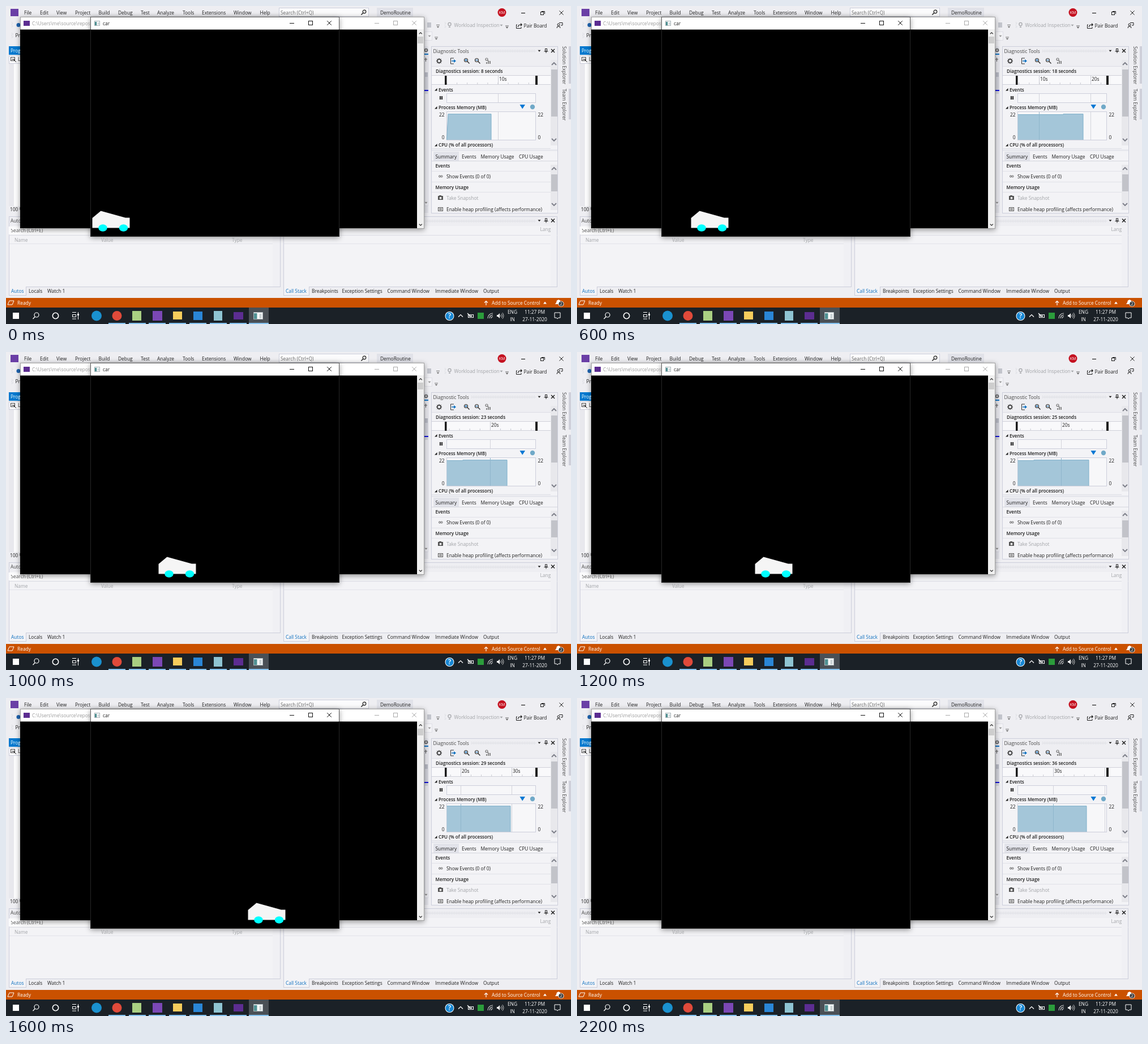
An HTML page with a canvas for the animation above (2.4 s loop, 998 by 561 pixels).

```html
<!DOCTYPE html>
<html lang="en">
<head>
<meta charset="utf-8">
<title>Car</title>
<style>
html, body { margin: 0; width: 100%; height: 100%; overflow: hidden; background: #eeeef2; }
canvas, svg.text { position: absolute; left: 0; top: 0; width: 998px; height: 561px; }
text { font-family: "Open Sans", "Noto Sans", sans-serif; white-space: pre; }
</style>
</head>
<body>
<canvas id="stage" width="998" height="561"></canvas>
<svg class="text" id="labels" viewBox="0 0 998 561"></svg>
<script>
const g = document.getElementById('stage').getContext('2d');
const labels = document.getElementById('labels');
const INK = '#1e1e1e', DIM = '#a2a4a8', BLUE = '#0e70c0', PALE = '#f3f3f6', EDGE = '#cccedb';
const STEP = 200, COUNT = 12;
// Session clock at each step, in seconds
const CLOCK = [8.7, 12.4, 16.05, 18.6, 20.8, 23.3, 25.4, 27.5, 29.7, 32.2, 34.3, 36.45];

// ---------- helpers ----------
function box(x, y, w, h, fill, stroke) {
  if (fill) { g.fillStyle = fill; g.fillRect(x, y, w, h); }
  if (stroke) { g.strokeStyle = stroke; g.lineWidth = 1; g.strokeRect(x + .5, y + .5, w - 1, h - 1); }
}
function trace(pts, close) {
  g.beginPath();
  for (let i = 0; i < pts.length; i += 2) g.lineTo(pts[i], pts[i + 1]);
  if (close) g.closePath();
}
function line(color, width, ...pts) {
  trace(pts);
  g.strokeStyle = color; g.lineWidth = width; g.stroke();
}
function poly(color, ...pts) {
  trace(pts, true);
  g.fillStyle = color; g.fill();
}
function disc(x, y, rx, color, ry = rx) {
  g.beginPath(); g.ellipse(x, y, rx, ry, 0, 0, 7);
  g.fillStyle = color; g.fill();
}
function ring(x, y, r, color, width = 1, from = 0, to = 7) {
  g.beginPath(); g.arc(x, y, r, from, to);
  g.strokeStyle = color; g.lineWidth = width; g.stroke();
}
function down(x, y, color, s = 2.5) { poly(color, x - s, y - s / 2, x + s, y - s / 2, x, y + s / 2 + .5); }
function cross(x, y, s, color, w = 1) {
  line(color, w, x - s, y - s, x + s, y + s);
  line(color, w, x + s, y - s, x - s, y + s);
}
function chevron(x, y, s, color, w = 1.2) { line(color, w, x - Math.abs(s), y + s / 2, x, y - s / 2, x + Math.abs(s), y + s / 2); }
function glass(x, y, r, color, dir = 1) {
  ring(x, y, r, color, 1.2);
  line(color, 1.4, x + dir * r * .7, y + r * .7, x + dir * r * 2, y + r * 2);
}
function controls(xs, y, color) {
  line(color, 1, xs[0] - 4, y + .5, xs[0] + 4, y + .5);
  box(xs[1] - 4, y - 4, 8, 8, null, color);
  cross(xs[2], y, 3.8, color);
}
function pin(x, y) {
  box(x - 2, y - 4, 4, 5, null, INK);
  line(INK, 1, x - 3.5, y + 1, x + 3.5, y + 1);
  line(INK, 1, x, y + 1, x, y + 4);
}
function grip(x, y, w) {
  g.fillStyle = '#b9bbc6';
  for (let i = 0; i < w; i += 3) {
    g.fillRect(x + i, y - 1.5, .8, .8);
    g.fillRect(x + i + 1.5, y, .8, .8);
    g.fillRect(x + i, y + 1.5, .8, .8);
  }
}
function paneTools(y) { down(942, y, INK); pin(954, y); cross(966, y, 3, INK, 1.4); }
function gear(x, y, r, color) {
  ring(x, y, r * .6, color, 1.4);
  for (let i = 0; i < 8; i++) {
    const c = Math.cos(i * Math.PI / 4), s = Math.sin(i * Math.PI / 4);
    line(color, 1.3, x + c * r * .7, y + s * r * .7, x + c * r, y + s * r);
  }
}
function windowIcon(x, y, w, h) {
  box(x, y, w, h, '#f6f8f8', '#aab4b8');
  box(x + 1, y + 2, w * .32, h - 3, '#4f9092');
  box(x + w * .62, y + 3, w * .22, h - 5, '#c9d2d5');
}
function shadowBox(x, y, w, h) {
  g.save();
  g.shadowColor = 'rgba(0,0,0,.4)'; g.shadowBlur = 9; g.shadowOffsetY = 2;
  box(x, y, w, h, '#fff');
  g.restore();
}
function say(str, x, y, o = {}) {
  const ns = 'http://www.w3.org/2000/svg', t = document.createElementNS(ns, 'text');
  const put = (el, set) => { for (const k in set) el.setAttribute(k, set[k]); };
  put(t, { x, y, fill: o.fill || INK, 'font-size': o.size || (o.bold ? 8.1 : 8.4) });
  if (o.bold) t.setAttribute('font-weight', 600);
  if (o.anchor) t.setAttribute('text-anchor', o.anchor);
  if (o.turn) t.setAttribute('transform', `rotate(90 ${x} ${y})`);
  t.textContent = str;
  let host = labels;
  if (o.clip) {
    const [cx, cy, w, h] = o.clip;
    host = document.createElementNS(ns, 'svg');
    put(host, { x: cx, y: cy, width: w, height: h, viewBox: o.clip.join(' '), overflow: 'hidden' });
    labels.append(host);
  }
  host.append(t);
  return t;
}

// ---------- still parts ----------
function drawIde() {
  box(0, 0, 998, 561, '#eeeef2');
  box(8, 5, 14, 13, '#6a3fa6');
  box(482, 3, 159, 16, '#fbfbfc', EDGE);
  glass(633, 10, 2.8, INK, -1);
  box(655, 3, 64, 17, '#e1e2e9');
  disc(876, 11.5, 7.5, '#c4101f');
  line(INK, 1.2, 910, 12.5, 917, 12.5);
  box(944, 10, 6, 6, null, INK);
  line(INK, 1, 946, 9.5, 951.5, 9.5, 951.5, 14);
  cross(981, 12, 3.6, INK);

  // Toolbars
  grip(10, 30, 3); grip(10, 35, 3); grip(10, 49, 3); grip(10, 54, 3);
  disc(22, 33.5, 3.5, '#1d63b0');
  box(744, 29, 7, 9, '#c3c5cc'); down(763, 37, '#777');
  line('#777', 1, 760, 33.5, 766, 33.5);
  grip(775, 30, 2); grip(775, 36, 2);
  ring(783.5, 32, 2.6, DIM, 1.2); line(DIM, 1.6, 782, 37, 785, 37);
  down(875, 34, DIM); down(885, 38, '#666'); line('#666', 1, 882, 35, 888, 35);
  line(INK, 1, 903, 33, 901.5, 33, 901.5, 39.5, 910, 39.5, 910, 37);
  line(INK, 1.2, 904, 37, 906, 33.5, 910, 33); poly(INK, 909, 30, 912, 33, 909, 36);
  ring(976, 33, 2, INK); line(INK, 1, 973, 39, 974, 36, 978, 36, 979, 39);
  line(INK, 1, 977, 29.5, 983, 29.5, 983, 34, 980, 34);
  box(739, 45, 14, 16, '#f4f4f7', '#dfdfe6'); down(748, 53, '#999');
  line('#777', 1, 757, 55, 763, 55); down(760, 58, '#777');

  // Editor edges
  box(5, 71, 20, 15, '#0079cf');
  box(5, 87, 21, 15, '#f8f8fa', EDGE);
  box(8, 90, 8, 7, null, '#444'); line(INK, 1, 13, 94, 18, 99); line(INK, 1, 10, 94, 15, 94);
  box(5, 102, 20, 251, '#fcfcfd'); box(5, 102, 9, 251, '#e8e8ed');
  box(739, 71, 7, 15, '#e4e5ec'); box(739, 84, 7, 2, '#0e70c0');
  gear(742, 78, 3.5, '#555');
  box(739, 87, 7, 266, '#ececf1', '#d6d7df');
  line('#555', 1, 739, 94, 744, 94); line('#555', 1, 741.5, 91, 741.5, 98);
  box(740, 117, 5, 8, '#b8bac4'); box(739, 125, 7, 30, '#d3d4dc'); box(739, 148, 7, 2, '#1010d8');
  down(742, 347, '#888'); box(739, 353, 7, 12, '#e1e2e8');

  // Bottom panes
  for (const [x, w] of [[5, 480], [490, 484]]) {
    box(x, 371, w, 125, PALE, EDGE);
    box(x + 1, 372, w - 2, 16, '#eeeef2');
    line('#e2e3ea', 1, x + 1, 419.5, x + w - 1, 419.5);
  }
  box(5, 389, 479, 14, '#fbfbfc');
  line('#dcdde4', 1, 5, 404.5, 485, 404.5); line('#dcdde4', 1, 490, 404.5, 974, 404.5);
  box(471, 405, 13, 90, '#f0f0f4'); box(962, 389, 11, 106, '#f0f0f4');
  box(5, 495, 31, 16, PALE, EDGE); box(490, 495, 46, 16, PALE, EDGE);
  box(6, 495, 29, 1, PALE); box(491, 495, 44, 1, PALE);
  grip(741, 379, 193); paneTools(378.5);

  // Side tabs
  box(994, 71, 4, 66, '#cfd0da'); box(994, 146, 4, 54, '#cfd0da');
}

function drawDiagnostics() {
  box(751, 71, 224, 295, PALE, EDGE);
  box(752, 72, 222, 34, '#eeeef2');
  grip(822, 79, 112); paneTools(79);
  gear(765, 97, 5, '#333');
  line('#333', 1, 791, 92, 785.5, 92, 785.5, 102, 791, 102);
  line(BLUE, 1.5, 787, 97, 793, 97); poly(BLUE, 791, 94, 795, 97, 791, 100);
  for (const x of [812.5, 831.5]) { glass(x, 95.5, 3, '#333'); line(BLUE, 1, x - 1.8, 95.5, x + 1.8, 95.5); }
  line(BLUE, 1, 812.5, 93.7, 812.5, 97.3);
  glass(849, 94, 2, '#777');
  for (let i = 0; i < 3; i++) box(848 + i * 3, 99 - i, 2, 3 + i, '#888');
  line('#dcdde4', 1, 752, 106.5, 974, 106.5);
  box(752, 122, 210, 17, '#f9f9fb');
  line('#d0d1d9', 1, 752, 122.5, 962, 122.5); line('#d0d1d9', 1, 752, 138.5, 962, 138.5);
  line('#dcdde4', 1, 752, 251.5, 962, 251.5);
  box(752, 253, 222, 3, '#e6e7ed');
  box(752, 256, 222, 18, '#f3f3f6'); box(755, 257, 45, 16, '#e2e3ea');
  line('#d6d7df', 1, 752, 273.5, 974, 273.5);
  for (const y of [291.5, 310.5, 328.5]) line('#e0e1e7', 1, 752, y, 962, y);

  // Scroll bars
  for (const [y, h, ty, th] of [[95, 151, 112, 83], [280, 80, 297, 30]]) {
    box(962, y, 12, h, '#e8e8ec');
    box(963, ty, 11, th, '#c2c3c9');
    chevron(968, y + 7, 4, '#7b7d87', 1.8); chevron(968, y + h - 10, -4, '#7b7d87', 1.8);
  }

  for (const y of [147, 179, 245]) poly(INK, 757, y + 2.5, 761.5, y + 2.5, 761.5, y - 2);
  box(766, 159, 2, 6, INK); box(769, 159, 2, 6, INK);
  poly('#0078d4', 907.5, 174, 917, 174, 912.2, 181.5);
  disc(930, 178, 4.2, '#70a9c8');

  ring(766, 300.5, 1.5, '#555'); ring(769.5, 300.5, 1.5, '#555');
  box(763, 335, 9, 7, '#555'); disc(767.5, 338.7, 2, '#eee'); box(765, 334, 4, 1, '#555');
  box(763, 355, 9, 7, null, '#555'); line('#555', 1, 765, 357.5, 770, 357.5); line('#555', 1, 765, 359.5, 770, 359.5);
}

function drawWindows() {
  shadowBox(25, 19, 714, 374);
  box(25, 19, 714, 374, '#fff', '#a0a0a0');
  box(25, 41.5, 701, 350.5, '#000');
  box(726, 41, 12, 351, '#f0f0f0'); box(727, 54, 10, 12, '#cdcdcd');
  chevron(732.3, 48, 2.5, '#333'); chevron(732.3, 386, -2.5, '#333');
  box(31, 26, 11, 9, '#5c2d91');
  controls([655, 688, 721], 30, '#aaa');

  shadowBox(149, 19, 440, 388);
  box(149, 19, 440, 23, '#fff', '#5a5a5a');
  box(149, 41.5, 440, 365.5, '#000');
  line('#262626', 1, 149.5, 42, 149.5, 406.5, 588.5, 406.5, 588.5, 42);
  box(150, 40, 438, 1.5, '#fff');
  windowIcon(156, 26, 10, 9);
  controls([505, 538, 571], 30, '#111');
}

function drawBars() {
  box(0, 515, 998, 17, '#ca5100');
  trace([6, 520, 14, 520, 11, 527, 3, 527], true); g.strokeStyle = '#fff'; g.lineWidth = 1; g.stroke();
  line('#fff', 1.2, 848, 528, 848, 520.5); line('#fff', 1.2, 845, 523.5, 848, 520.5, 851, 523.5);
  poly('#fff', 949, 525.5, 955, 525.5, 952, 521.5);
  poly('#fff', 970, 526, 972, 523, 973, 519.5, 976, 518, 979, 519.5, 979, 526);
  disc(980.5, 525.5, 5, '#fff'); disc(980.5, 525.5, 4.2, '#3a3a3a');

  box(0, 532, 998, 29, '#1b2127');
  box(12, 541, 11, 11, '#fff');
  ring(54, 545, 4, '#fff', 1.2); line('#fff', 1.3, 51.3, 548, 47.5, 552);
  ring(87.5, 546.5, 5.2, '#fff', 1.6);
  box(117, 544, 7, 5, null, '#fff');
  line('#fff', 1, 117, 540.5, 124, 540.5); line('#fff', 1, 117, 552, 124, 552);
  line('#fff', 1, 127.5, 540, 127.5, 553); box(126, 543, 3, 3, '#fff');
  disc(160, 546.5, 9, '#1a91cf');
  disc(196, 546.5, 8.5, '#e04a3a');
  box(429, 532, 35, 29, '#4a5056');
  const apps = [[223, 538, 16, 17, '#a9cf82'], [259, 538, 17, 17, '#7b48b5'], [295, 539, 16, 14, '#f6cc5c'],
    [331, 539, 16, 15, '#2a86d6'], [367, 538, 15, 17, '#8fc4d2'], [402, 540, 17, 13, '#5c2d91']];
  apps.forEach(a => box(...a));
  windowIcon(437, 540, 17, 13);
  for (let i = 0; i < 7; i++) box(Math.round(181 + i * 35.7), 559, 30, 2, '#86c4f2');
  box(429, 559, 35, 2, '#86c4f2');

  disc(783.5, 547, 8, '#fff'); disc(783.5, 547, 7, '#1787d4');
  chevron(803, 546.5, 4, '#fff', 1.2);
  box(816, 544, 10, 6, null, '#fff'); box(818, 546, 5, 2, '#fff'); line('#fff', 1.2, 815, 542, 819, 546);
  box(833, 541, 11, 11, '#2b9c3b');
  for (const r of [3, 6, 9]) ring(860, 551, r, '#ddd', 1.1, Math.PI, Math.PI * 1.5);
  poly('#fff', 867, 545, 869, 545, 872, 542, 872, 551, 869, 548, 867, 548);
  for (const r of [2.5, 5, 7.5]) ring(871.5, 546.5, r, '#ddd', .9, -.8, .8);
  trace([969, 541, 979, 541, 979, 550, 975.5, 550, 974, 552, 972.5, 550, 969, 550], true);
  g.strokeStyle = '#fff'; g.lineWidth = 1; g.stroke();
}

function writeLabels() {
  const row = (y, items, o) => items.forEach(([x, s]) => say(s, x, y, o));
  row(14.5, [[32, 'File'], [60, 'Edit'], [89, 'View'], [122, 'Project'], [163.5, 'Build'], [198, 'Debug'],
    [238, 'Test'], [267, 'Analyze'], [312, 'Tools'], [346, 'Extensions'], [402, 'Window'], [448.5, 'Help'], [661, 'DemoRoutine']]);
  say('Search (Ctrl+Q)', 485, 14.5, { fill: '#666' });
  say('KM', 876, 14.3, { fill: '#fff', size: 7, anchor: 'middle' });
  say('Workload Inspection', 791.5, 37, { fill: DIM });
  say('Pair Board', 914.5, 38);
  say('Program', 8, 82, { fill: '#fff', clip: [5, 71, 20, 15] });
  say('Lab', 21, 97, { clip: [5, 87, 20, 15] });
  say('Process', 16.5, 55, { clip: [5, 45, 20, 15] });
  say('100 %', 7, 362, { clip: [5, 352, 20, 15] });
  say('C:\\Users\\me\\source\\repos\\', 46, 33.5, { fill: '#999', clip: [25, 20, 123, 20] });
  say('car', 171, 33.5);
  say('Autos', 8, 382, { fill: '#444', clip: [5, 372, 20, 18] });
  say('Search (Ctrl+E)', 8.5, 398.5, { fill: '#555', clip: [5, 393, 144, 12] });
  row(415.5, [[15, 'Name'], [168, 'Value'], [399, 'Type']], { fill: DIM });
  say('Lang', 943.5, 397, { fill: DIM, clip: [930, 385, 32, 20] });
  row(505.5, [[9, 'Autos'], [494, 'Call Stack']], { fill: BLUE });
  row(505.5, [[40, 'Locals'], [73, 'Watch 1'], [540, 'Breakpoints'], [593.5, 'Exception Settings'],
    [673.5, 'Command Window'], [758, 'Immediate Window'], [843, 'Output']]);

  say('Diagnostic Tools', 754.5, 82.5, { fill: '#444' });
  say('Events', 764, 150.5, { bold: 1 });
  say('Process Memory (MB)', 764, 182, { bold: 1 });
  say('CPU (% of all processors)', 764, 248, { bold: 1 });
  say('22', 774.5, 195, { anchor: 'end' }); say('0', 774.5, 234.5, { anchor: 'end' });
  say('22', 939.5, 195); say('0', 939.5, 234.5);
  row(268.5, [[758.5, 'Summary'], [805, 'Events'], [838.5, 'Memory Usage'], [906, 'CPU Usage']]);
  say('Events', 758.5, 285, { bold: 1 });
  say('Memory Usage', 758.5, 323, { bold: 1 });
  say('Show Events (0 of 0)', 778, 303.5);
  say('Take Snapshot', 778, 342, { fill: DIM });
  say('Enable heap profiling (affects performance)', 778, 362);
  say('Solution Explorer', 982.5, 71, { turn: 1, fill: '#444' });
  say('Team Explorer', 982.5, 146, { turn: 1, fill: '#444' });

  say('Ready', 20, 526.5, { fill: '#fff' });
  say('Add to Source Control', 858, 526.5, { fill: '#fff' });
  say('2', 980.5, 528.4, { fill: '#fff', size: 7.5, anchor: 'middle' });
  say('?', 783.5, 551.3, { fill: '#fff', size: 12, bold: 1, anchor: 'middle' });
  const tray = { fill: '#fff', anchor: 'middle' };
  say('ENG', 894.5, 543, tray); say('IN', 894.5, 555.5, tray);
  say('11:27 PM', 934, 543, tray); say('27-11-2020', 934, 555.5, tray);
}

// ---------- moving parts ----------
const session = say('', 759, 117.5, { bold: 1 });
const marks = [0, 1].map(() => say('', 0, 132, { clip: [779, 124, 155, 14] }));

function drawChart(t) {
  const scale = 9.05, left = 778, right = 936, jump = 5.75;
  const start = jump * Math.max(0, Math.ceil((t - 17.4) / jump));
  const at = s => left + .5 + (s - start) * scale;
  const end = Math.round(at(t) - .5);

  for (let s = Math.ceil(start / 2) * 2; at(s) < right; s += 2)
    if (at(s) > left) line('#c9cad2', 1, at(s), 135, at(s), 138);
  box(775, 123, 3.5, 16, '#1b1b1b'); box(935, 123, 4, 16, '#1b1b1b');
  box(left, 154, 158, 17, '#f7f7f9', EDGE);
  box(left, 186, 158, 51, '#f7f7f9', EDGE);

  // Usage rises slightly part way through the session
  const rise = Math.round(at(14.65)), stepped = t > 14.65 && rise > left;
  const top = stepped ? 191.5 : 190.5;
  const shape = [left + .5, start ? top : 236];
  if (!start) shape.push(left + 3, top);
  if (stepped) shape.push(rise, top, rise, 190.5);
  shape.push(end, 190.5, end, 236);
  poly('#a4c6d9', ...shape, left + .5, 236);
  line('#7fb0ca', 1, ...shape);

  const tens = [];
  for (let s = Math.ceil(start / 10) * 10; at(s) < right; s += 10) if (s > 0) tens.push(s);
  tens.forEach(s => {
    const x = Math.floor(at(s)) + .5;
    line('#c9cad2', 1, x, 123, x, 138);
    line('#d3d4db', 1, x, 155, x, 170);
    line(x < end ? '#8fb6cc' : '#d3d4db', 1, x, 187, x, 236);
  });
  marks.forEach((m, i) => {
    m.textContent = tens[i] ? tens[i] + 's' : '';
    if (tens[i]) m.setAttribute('x', Math.floor(at(tens[i])) + 2);
  });
  // The readout runs slightly ahead of the chart
  session.textContent = `Diagnostics session: ${Math.floor(t + .2)} seconds`;
}

function drawCar(n) {
  const x = 152.5 + Math.round(8.95 * n + 7.25 * n * (n - 1) / 2);
  g.save();
  g.beginPath(); g.rect(150, 42, 438, 364); g.clip();
  g.translate(x, 0);
  poly('#f5f5f5', 0, 374, 15, 361.5, 58.5, 373.5, 66, 373.5, 66, 391.5, 0, 391.5);
  disc(18.5, 391.5, 7.7, '#0ff', 6.2);
  disc(55, 391.5, 7.7, '#0ff', 6.2);
  g.restore();
}

writeLabels();
let shown = -1;
const began = performance.now();
function tick() {
  const n = Math.floor((performance.now() - began) / STEP) % COUNT;
  if (n !== shown) {
    shown = n;
    drawIde();
    drawDiagnostics();
    drawChart(CLOCK[n]);
    drawWindows();
    drawBars();
    drawCar(n);
  }
  requestAnimationFrame(tick);
}
tick();
</script>
</body>
</html>
```
